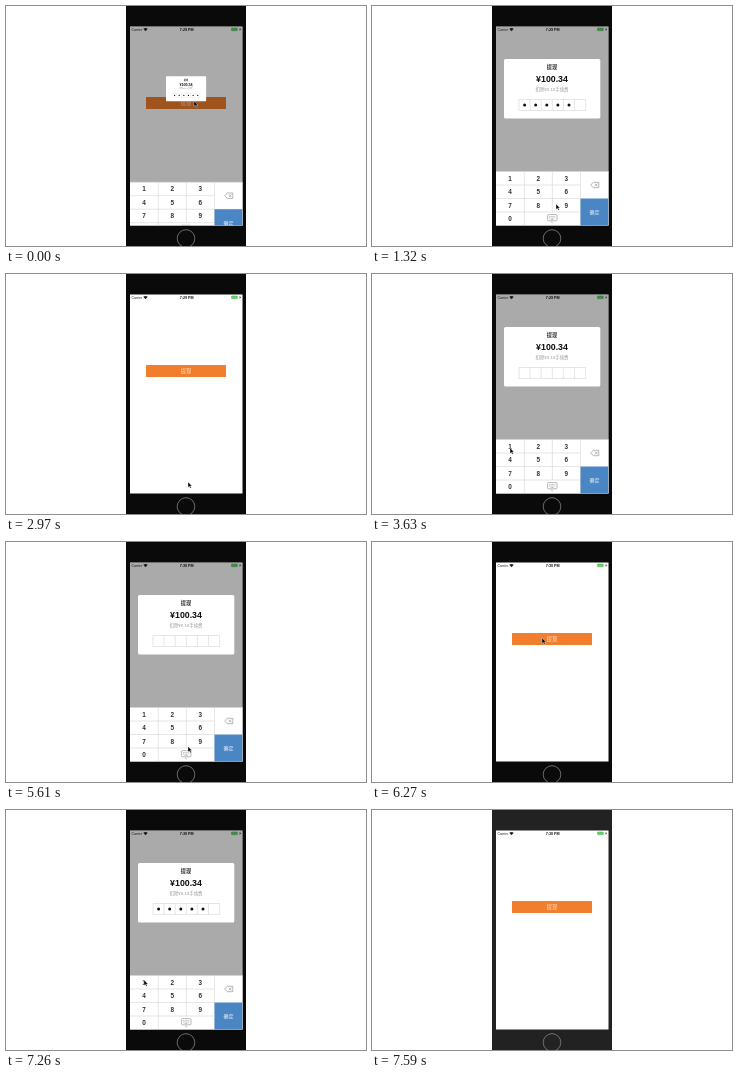
An HTML page for the animation above (7.92 s loop, 360 by 240 pixels).

```html
<!DOCTYPE html>
<html lang="zh">
<head>
<meta charset="utf-8">
<style>
  html, body { margin: 0; width: 100%; height: 100%; overflow: hidden; background: #fff; }
  svg { display: block; width: 100vw; height: 100vh; }
  text { font-family: "Liberation Sans", "Noto Sans CJK SC", "Noto Sans CJK", sans-serif; text-anchor: middle; }
  .b { font-weight: bold; }
  .line { fill: none; stroke: #d6d6d6; stroke-width: .6; }
</style>
</head>
<body>
<svg viewBox="0 0 360 240">
  <defs><clipPath id="screen"><rect x="124" y="20.5" width="112.5" height="199"/></clipPath></defs>
  <rect width="360" height="240" fill="#fff"/>
  <rect id="bezel" x="120" width="120" height="240"/>
  <circle cx="180" cy="232.5" r="8.8" fill="none" stroke="#858585" stroke-width=".8"/>

  <g clip-path="url(#screen)">
    <rect x="124" y="20" width="113" height="200" fill="#fff"/>
    <rect x="140" y="91" width="80" height="12" rx=".6" fill="#f07e2c"/>
    <text x="180" y="99" font-size="5.2" fill="#fde6d2">提现</text>
    <text x="130.8" y="24.9" font-size="3.5" fill="#222">Carrier</text>
    <path d="M137.3 22.8q2.2-1.7 4.4 0l-2.2 2.4z" fill="#222"/>
    <text class="b" x="180.7" y="25" font-size="3.7" fill="#111" id="clock"></text>
    <rect x="225.4" y="21.9" width="6" height="2.9" rx=".6" fill="#62cf68" stroke="#58a95c" stroke-width=".4"/>
    <path d="M234.4 21.6l-1.3 2h.9l-.4 1.6 1.4-2.1h-.9z" fill="#222"/>
    <rect id="shade" x="124" y="20" width="113" height="200" fill="#000" opacity=".335"/>

    <g id="dialog">
      <rect x="132" y="53" width="96.3" height="59.5" rx="1.6" fill="#fff"/>
      <text class="b" x="180" y="63.2" font-size="5.2" fill="#333">提现</text>
      <text class="b" x="180" y="76.2" font-size="8.8" fill="#111">¥100.34</text>
      <text x="180" y="84.5" font-size="4.4" fill="#999">扣除¥0.10手续费</text>
      <path id="cells" class="line"/>
      <g id="dots" fill="#111"></g>
    </g>

    <g id="pad">
      <rect x="124" y="165.5" width="113" height="55" fill="#fff"/>
      <g id="digits" class="b" font-size="6.4" fill="#333"></g>
      <path class="line" d="M124 165.5h113M124 179h84.5M124 192.5h84.5M124 206h84.5M152.3 165.5v54M180.4 165.5v40.5M208.5 165.5v54"/>
      <g fill="none" stroke="#888" stroke-width=".6">
        <path d="M218.6 179l2.8-2.7h5.4v5.4h-5.4zM222.9 177.6l2.6 2.8m0-2.8l-2.6 2.8"/>
        <rect x="175.6" y="208.6" width="9.4" height="6.2" rx="1"/>
        <path d="M177.2 210.6h6.2M177.2 212.1h6.2M178.6 213.5h3.4M179 216l1.3 1 1.3-1" stroke-dasharray="1 .5"/>
      </g>
      <rect x="208.5" y="192.5" width="28" height="28" fill="#4a86c4"/>
      <text x="222.6" y="208" font-size="5" fill="#eef5fc">确定</text>
    </g>
  </g>
  <path id="cursor" d="M0 0v5.4l1.3-1.1 1 2 1-.5-1-1.9h1.7z" fill="#000" stroke="#fff" stroke-width=".35"/>
</svg>
<script>
const STEP = 330, LOOP = 7920;
const $ = id => document.getElementById(id);

// Views: w plain page, s shade only, o opening, d dialog with keypad
const views = "odddddd" + "wdww" + "ddddddd" + "wwsddw";
const filled = "602456600000543210000050";
const pointer = [
  [188, 95], [137, 170], [150, 170], [162, 177], [184, 198], [186, 208], [221, 206],
  [198, 79], [182, 208], [182, 208], [150, 96],
  [138, 174], [138, 174], [211, 174], [228, 177], [224, 177], [224, 177], [182, 204.5],
  [182, 169], [170, 96], [169.5, 96], [138, 170], [138, 170], null
];

function build() {
  let cells = "M147 93.5h66.6v11h-66.6z", dots = "", digits = "";
  for (let i = 1; i < 6; i++) cells += `M${147 + i * 11.1} 93.5v11`;
  for (let i = 0; i < 6; i++) dots += `<circle cx="${152.6 + i * 11.1}" cy="99" r="1.5"/>`;
  for (let i = 0; i < 10; i++) {
    const x = 138 + i % 3 * 28.2, y = 174.6 + Math.floor(i / 3) * 13.5;
    digits += `<text x="${x}" y="${y}">${(i + 1) % 10}</text>`;
  }
  $("cells").setAttribute("d", cells);
  $("dots").innerHTML = dots;
  $("digits").innerHTML = digits;
}

const show = (id, on) => $(id).setAttribute("visibility", on ? "visible" : "hidden");
const move = (id, value) => $(id).setAttribute("transform", value);

function render(time) {
  const i = Math.floor(time % LOOP / STEP);
  const view = views[i], at = pointer[i];
  show("shade", view !== "w");
  show("dialog", view === "d" || view === "o");
  show("pad", view !== "w");
  move("dialog", view === "o" ? "translate(180 82.7) scale(.417) translate(-180 -82.7)" : "");
  move("pad", `translate(0 ${{ o: 10.7, s: 52 }[view] || 0})`);
  [...$("dots").children].forEach((dot, n) => {
    dot.setAttribute("display", n < +filled[i] ? "inline" : "none");
  });
  $("clock").textContent = i < 16 ? "7:29 PM" : "7:30 PM";
  $("bezel").setAttribute("fill", i === 23 ? "#222" : "#0a0a0a");
  show("cursor", at);
  if (at) move("cursor", `translate(${at})`);
}

build();
const start = performance.now();
function tick() {
  render(performance.now() - start);
  requestAnimationFrame(tick);
}
tick();
</script>
</body>
</html>
```
